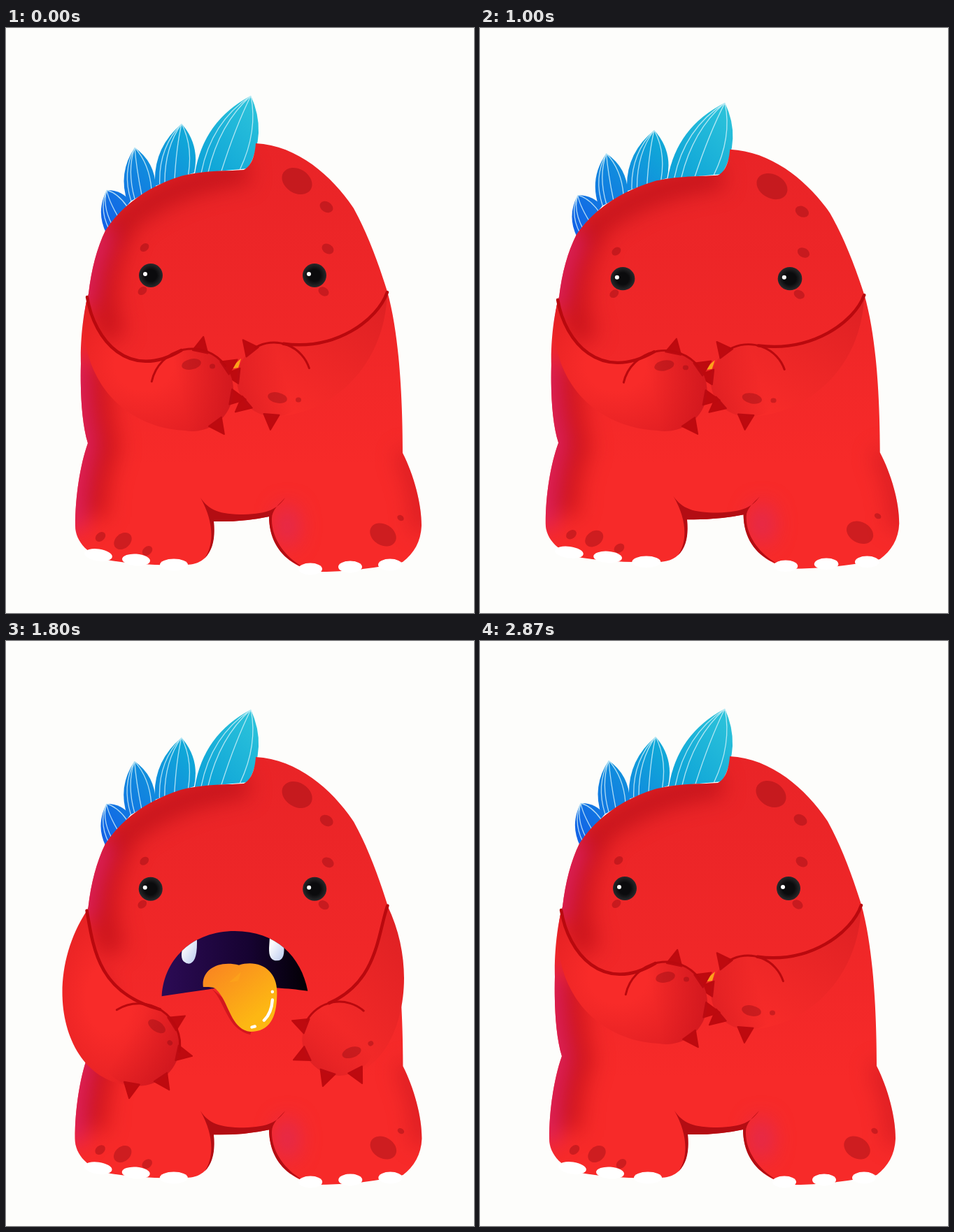
These frames come from a looping animation (669x837 px, 2910 ms). An HTML page:

```html
<!DOCTYPE html>
<html lang="en">
<head>
<meta charset="utf-8">
<title>Shy monster</title>
<style>
  html, body { margin: 0; width: 100%; height: 100%; overflow: hidden; background: #fdfdfb; }
  svg { display: block; width: 669px; height: 837px; }
  .line { fill: none; stroke: #b9090e; stroke-width: 4.5; stroke-linecap: round; }
  .claw { fill: #be0a0f; stroke: #be0a0f; stroke-width: 2; stroke-linejoin: round; }
  .spot { fill: #8f0a12; fill-opacity: .4; }
  .vein { fill: none; stroke: #d5f3fa; stroke-width: 1.3; stroke-opacity: .8; }
</style>
</head>
<body>
<svg viewBox="0 0 669 837">
  <defs>
    <path id="shape" d="M357 165C418 168 468 214 497 258C519 298 535 345 545 377C553 405 558 440 561 470C565 510 567 560 567 608C583 640 594 680 594 712C593 735 583 752 567 764Q510 778 440 778C400 767 377 740 376 699Q340 707 297 706C299 735 294 767 258 768Q200 770 150 762C118 756 99 735 99 712C99 670 106 625 117 594C108 565 106 520 107 480C106 440 112 400 118 380C122 345 130 315 142 290C165 255 200 228 250 212C285 203 320 205 340 203C352 197 356 180 357 165Z"/>
    <path id="lips" d="M225 504C228 455 268 418 327 418C385 418 420 452 429 497C400 493 330 488 290 495Q260 499 225 504Z"/>
    <clipPath id="inBody"><use href="#shape"/></clipPath>
    <clipPath id="inMouth"><use href="#lips"/></clipPath>
    <filter id="soft" x="-60%" y="-60%" width="220%" height="220%" color-interpolation-filters="sRGB"><feGaussianBlur stdDeviation="15"/></filter>
    <linearGradient id="skin" x2="0" y2="1">
      <stop offset="0" stop-color="#e92427"/><stop offset=".45" stop-color="#f02728"/><stop offset=".75" stop-color="#f72a29"/>
    </linearGradient>
    <linearGradient id="leaf" gradientUnits="userSpaceOnUse" x1="350" y1="100" x2="150" y2="290">
      <stop offset="0" stop-color="#2cc3da"/><stop offset=".4" stop-color="#10a6d8"/><stop offset="1" stop-color="#1263e6"/>
    </linearGradient>
    <radialGradient id="fillL" cx=".4" cy=".5" r=".65"><stop offset=".3" stop-color="#f82b29"/><stop offset="1" stop-color="#e01e22"/></radialGradient>
    <linearGradient id="fillR" x1="1" y1="0" x2=".3" y2=".9"><stop offset="0" stop-color="#dd2023"/><stop offset="1" stop-color="#f72b29"/></linearGradient>
    <linearGradient id="shade"><stop offset=".35" stop-color="#b80d18" stop-opacity="0"/><stop offset="1" stop-color="#b80d18" stop-opacity=".35"/></linearGradient>
    <linearGradient id="dark"><stop offset="0" stop-color="#2c0b55"/><stop offset=".6" stop-color="#160331"/><stop offset="1" stop-color="#020004"/></linearGradient>
    <linearGradient id="gold" x2=".7" y2=".8"><stop offset="0" stop-color="#f98122"/><stop offset="1" stop-color="#fdb713"/></linearGradient>
    <linearGradient id="tooth" x2="1" y2="1"><stop offset=".2" stop-color="#fff"/><stop offset="1" stop-color="#b9c9ee"/></linearGradient>
    <radialGradient id="ball"><stop offset=".5" stop-color="#0b0b0d"/><stop offset="1" stop-color="#29292b"/></radialGradient>
  </defs>

  <g id="monster">
    <g id="leaves"/>
    <use href="#shape" fill="url(#skin)"/>
    <g clip-path="url(#inBody)">
      <g filter="url(#soft)" fill="none">
        <path d="M346 204C300 213 225 222 150 292" stroke="#b80f18" stroke-width="34" stroke-opacity=".75"/>
        <path d="M165 285C135 340 130 400 155 445M125 480Q130 560 142 600Q122 650 125 700" stroke="#bd0d17" stroke-width="40" stroke-opacity=".7"/>
        <path d="M145 285C122 330 117 360 112 400M104 470Q104 550 116 595Q98 650 98 720" stroke="#d81f68" stroke-width="26"/>
        <path d="M568 605Q596 660 594 720" stroke="#c4141e" stroke-width="26" stroke-opacity=".6"/>
        <ellipse cx="402" cy="712" rx="17" ry="30" fill="#d82a62" fill-opacity=".7"/>
      </g>
    </g>
    <path fill="#b30d13" d="M278 672C290 690 305 696 340 696C375 695 388 688 399 672C390 682 379 690 380 704C380 730 398 756 424 771C396 761 376 736 376 699Q340 707 297 706C299 728 297 745 284 759C298 738 297 706 278 672Z"/>
    <g id="marks"/>

    <g id="mouth">
      <use href="#lips" fill="url(#dark)"/>
      <g clip-path="url(#inMouth)" fill="url(#tooth)">
        <path d="M256 425L274 425Q276 460 263 461Q251 460 253 446Z"/>
        <path d="M376 425L395 432Q399 457 386 457Q374 457 375 440Z"/>
      </g>
    </g>
    <g id="tongue">
      <path fill="#d3161e" d="M296 493C316 512 316 547 348 555L352 540Z"/>
      <path fill="url(#gold)" d="M286 492C283 470 305 456 333 463C360 455 384 470 383 500C383 530 375 551 348 551C322 548 320 512 304 496C300 491 292 492 286 492Z"/>
      <path fill="none" stroke="#fff" stroke-width="4" stroke-linecap="round" d="M377 498v.5M377 509Q376 526 366 536M350 545l4-1"/>
    </g>
    <path fill="#fca11b" d="M319 488L336 473L332 486Z"/>
    <g id="arms"/>
  </g>
</svg>
<script>
const LOOP = 2910;
const el = id => document.getElementById(id);
const add = (id, markup) => el(id).insertAdjacentHTML("beforeend", markup);
const set = (id, name, value) => el(id).setAttribute(name, value);
const mix = (a, b, u) => a.map((v, i) => v + (b[i] - v) * u);
const rad = deg => deg * Math.PI / 180;
const polar = (deg, r) => [r * Math.cos(rad(deg)), r * Math.sin(rad(deg))];
const plus = ([a, b], [c, d]) => [a + c, b + d];
const spin = ([x, y], deg) => plus(polar(deg, x), polar(deg + 90, y));
const ellipse = (x, y, rx, ry, tilt, look) =>
  `<ellipse cx="${x}" cy="${y}" rx="${rx}" ry="${ry}" transform="rotate(${tilt} ${x} ${y})" ${look}/>`;

// A leaf bulges on both sides; its veins are blends of the two sides.
function leaf(tip, left, right) {
  const bend = (end, side) => {
    const [dx, dy] = [end[0] - tip[0], end[1] - tip[1]];
    return plus(mix(tip, end, .5), [side * dy * .25, -side * dx * .25]);
  };
  const a = bend(left, -1), b = bend(right, 1);
  const veins = [.12, .25, .5, .85].map(u => `M${tip}Q${mix(a, b, u)} ${mix(left, right, u)}`);
  add("leaves", `<path fill="url(#leaf)" d="M${tip}Q${b} ${right}L${left}Q${a} ${tip}"/><path class="vein" d="${veins.join("")}"/>`);
}
leaf([144, 232], [143, 293], [178, 248]);
leaf([184, 171], [174, 250], [214, 228]);
leaf([251, 137], [213, 226], [269, 207]);
leaf([350, 97], [270, 208], [346, 201]);

function spot(x, y, r) {
  add("marks", ellipse(x, y, r, r * .75, x < 330 ? -40 : 32, 'class="spot"'));
}
spot(416, 219, 23); spot(458, 256, 10); spot(460, 316, 9); spot(454, 377, 8);
spot(198, 314, 7); spot(195, 376, 7);
spot(135, 728, 8); spot(167, 734, 14); spot(202, 748, 8); spot(539, 725, 20); spot(564, 701, 5);

for (let i = 0; i < 3; i++) {
  add("marks", ellipse(132 + 54 * i, 754 + 7 * i, 20, 8.5, 8 - 4 * i, 'fill="#fff"'));
  add("marks", ellipse(435 + 57 * i, 774 - 3 * i, 17, 8.5, 0, 'fill="#fff"'));
}
for (const x of [207, 441]) {
  add("marks", ellipse(x, 354, 17, 17, 0, 'fill="url(#ball)"') + ellipse(x - 8, 352, 3, 3, 0, 'fill="#fff"'));
}

// Each hand is a circle with places for three poses: covering, open, wide open.
const arms = {
  R: { side: 1, r: 53, shoulder: [545, 378], hand: [[383, 503], [459, 564], [485, 571]], turn: -31,
       upper: [-14, 40], wrist: [75, 10], reach: 70, elbow: 312, claw: -128, step: -46,
       crease: [-120, -18], pads: [5, 26] },
  L: { side: -1, r: 59, shoulder: [116, 385], hand: [[266, 518], [207, 572], [181, 580]], turn: 46,
       upper: [10, 62], wrist: [-75, 45], reach: 97, elbow: -65, claw: -78, step: 44,
       crease: [-168, -36], pads: [-1, -37] }
};

for (const [id, arm] of Object.entries(arms)) {
  const { r, pads: [x, y] } = arm;
  let claws = "";
  for (let i = 0; i < 4; i++) {
    claws += `<path class="claw" d="M${r - 3} -11V11L${r + 19} 0Z" transform="rotate(${arm.claw + arm.step * i})"/>`;
  }
  add("arms", `<path id="arm${id}" fill="url(#fill${id})"/><path id="edge${id}" class="line"/>
    <g id="hand${id}">${claws}
      <circle r="${r}" fill="url(#shade)" transform="rotate(${arm.claw + arm.step * 1.5})"/>
      <path class="line" style="stroke-width:3" d="M${polar(arm.crease[0], r)}A${r} ${r} 0 0 1 ${polar(arm.crease[1], r)}"/>
      ${ellipse(x, y, 14, 7.5, 12 * arm.side, 'class="spot"')}${ellipse(x + 30, y + 3, 4, 3.5, 0, 'class="spot"')}
    </g>`);
}

function drawArm(id, p) {
  const { side, r, shoulder, hand, ...arm } = arms[id];
  const center = p < 1 ? mix(hand[0], hand[1], p) : mix(hand[1], hand[2], p - 1);
  const turn = arm.turn * Math.min(p, 1);
  const top = plus(center, polar(-90 + 15 * side + turn, r));
  const bottom = plus(center, polar(90 - 10 * side, r));
  const edge = `M${shoulder}C${plus(shoulder, arm.upper)} ${plus(top, spin(arm.wrist, turn))} ${top}`;
  const large = Math.abs(turn) < 25 ? 1 : 0, sweep = side < 0 ? 1 : 0;
  const outer = `C${plus(bottom, [side * arm.reach, -5])} ${[center[0] * .6 + arm.elbow, 488]} ${shoulder}Z`;
  set("edge" + id, "d", edge);
  set("arm" + id, "d", `${edge}A${r} ${r} 0 ${large} ${sweep} ${bottom}${outer}`);
  set("hand" + id, "transform", `translate(${center}) rotate(${turn})`);
}

const clamp = u => Math.max(0, Math.min(1, u));
const ease = (x, from, to) => { const u = clamp((x - from) / (to - from)); return u * u * (3 - 2 * u); };
const bump = (t, peak, half) => Math.cos(clamp(Math.abs(t - peak) / half) * Math.PI / 2) ** 2;
const scaleAt = (x, y, sx, sy) => `translate(${x} ${y}) scale(${sx} ${sy}) translate(${-x} ${-y})`;

function draw() {
  const t = performance.now() % LOOP;
  // Crouch, hop, land, small hop, land.
  const lift = 25 * bump(t, 790, 290) + 20 * bump(t, 1350, 190);
  const squash = .04 * bump(t, 290, 260) - .012 * bump(t, 790, 200) + .032 * bump(t, 1080, 200)
               - .006 * bump(t, 1350, 120) + .02 * bump(t, 1640, 200);
  const open = 2 * ease(t, 1010, 1440) - ease(t, 1640, 2050) - ease(t, 2130, 2600);
  const wide = .13 * Math.max(open - 1, 0);

  set("monster", "transform", `translate(0 ${-lift}) ` + scaleAt(346, 777, 1 + squash, 1 - squash));
  set("mouth", "transform", scaleAt(327, 460, ease(open, 0, .6) + wide / 4, Math.min(open, 1) + wide));
  const tongue = ease(open, 0, .7) + wide;
  set("tongue", "transform", scaleAt(333, 462, tongue, tongue));
  for (const id in arms) drawArm(id, open);
  requestAnimationFrame(draw);
}
draw();
</script>
</body>
</html>
```
